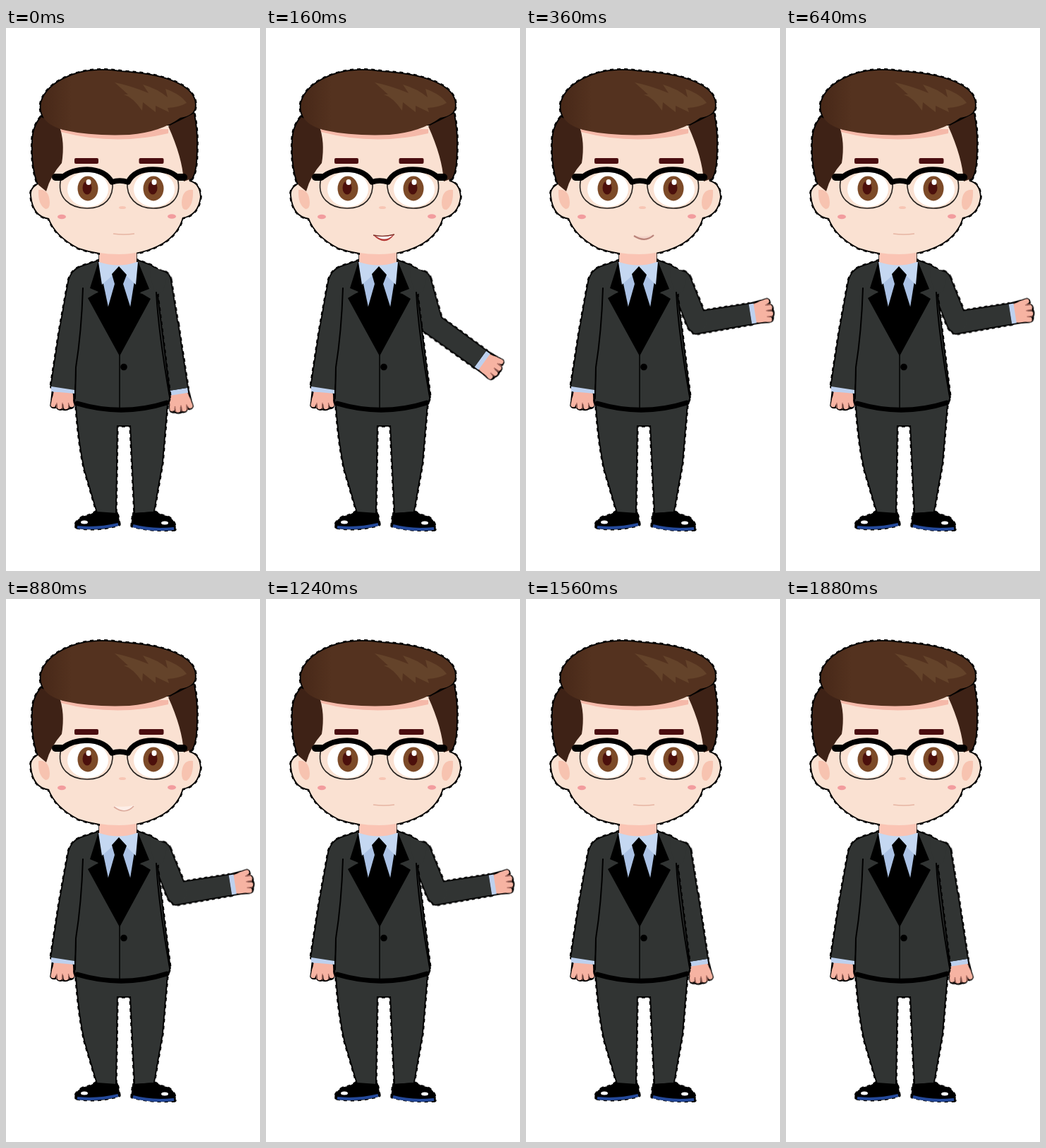
Animation, 360 px wide and 768 px high, one loop 1920 ms. Source, as an HTML page:

```html
<!DOCTYPE html>
<html lang="en">
<head>
<meta charset="utf-8">
<title>Presenter</title>
<style>
html, body { margin: 0; width: 100%; height: 100%; overflow: hidden; background: #fff; }
svg { display: block; width: 100%; height: 100%; }

.edge { stroke: #000; stroke-width: 3.6; stroke-linejoin: round; }
.rough { stroke-width: 5.4; stroke-dasharray: 5 5; }
.suit { fill: #313433; }
.skin { fill: #fae1d2; }
.side { fill: #3e2216; }
.line { fill: none; stroke: #000; stroke-linecap: round; stroke-linejoin: round; }

/* right arm: raise in 0-320 ms, lower in 1240-1520 ms */
.upper { animation: upper 1920ms infinite; }
.fore { animation: fore 1920ms infinite; }
.sleeve { animation: sleeve 1920ms infinite; }
.wrist { animation: wrist 1920ms infinite; }
@keyframes upper {
  0% { transform: rotate(81deg); animation-timing-function: steps(8); }
  16.667%, 64.583% { transform: rotate(68deg); animation-timing-function: steps(7); }
  79.167%, 100% { transform: rotate(81deg); }
}
@keyframes fore {
  0% { transform: rotate(0deg); animation-timing-function: steps(8); }
  16.667%, 64.583% { transform: rotate(-77deg); animation-timing-function: steps(7); }
  79.167%, 100% { transform: rotate(0deg); }
}
@keyframes sleeve {
  0% { transform: scaleX(1); animation-timing-function: steps(8); }
  16.667%, 64.583% { transform: scaleX(.83); animation-timing-function: steps(7); }
  79.167%, 100% { transform: scaleX(1); }
}
@keyframes wrist {
  0% { transform: translateX(92px); animation-timing-function: steps(8); }
  16.667%, 64.583% { transform: translateX(76px); animation-timing-function: steps(7); }
  79.167%, 100% { transform: translateX(92px); }
}

/* blink twice per loop */
.open-eyes { animation: awake 960ms step-end infinite; }
.shut-eyes { animation: blink 960ms step-end infinite; }
@keyframes awake { 0%, 50% { opacity: 1; } 41.667% { opacity: 0; } }
@keyframes blink { 0%, 50% { opacity: 0; } 41.667% { opacity: 1; } }

/* talking, eight steps of 40 ms */
.closed { animation: closed 320ms step-end infinite; }
.smile { animation: smile 320ms step-end infinite; }
.pale { animation: pale 320ms step-end infinite; }
.talk { transform-origin: 167px 293px; animation: talk 320ms step-end infinite; }
@keyframes closed { 0%, 87.5% { opacity: 1; } 12.5% { opacity: 0; } }
@keyframes smile { 0%, 25% { opacity: 0; } 12.5% { opacity: 1; } }
@keyframes pale { 0%, 87.5% { opacity: 0; } 75% { opacity: 1; } }
@keyframes talk {
  0%, 75% { opacity: 0; transform: none; }
  25%, 62.5% { opacity: 1; transform: scaleY(.85); }
  37.5%, 50% { opacity: 1; transform: none; }
}
</style>
</head>
<body>
<svg viewBox="0 0 360 768" preserveAspectRatio="none">
<defs>
  <linearGradient id="quiff">
    <stop offset="0" stop-color="#472818"/>
    <stop offset=".2" stop-color="#54321f"/>
  </linearGradient>
  <g id="hand">
    <path fill="#f6b3a2" d="M5 -13 L20 -16 Q26 -15 25 -8 L25 12 Q20 16 5 13Z"/>
    <path fill="none" stroke="#f6b3a2" stroke-width="7" stroke-linecap="round" d="M16 -12 L26 -14 M18 -5 L29 -5 M18 3 L29 4 M16 10 L26 12"/>
    <path fill="none" stroke="#a8665c" stroke-width="1.300" d="M23 -9 L31 -9.5 M23 -1 L32 -1 M23 7.5 L31 8"/>
    <path fill="#bdd0ee" d="M0 -14 H7 V14 H0Z"/>
  </g>
  <path id="handEdge" d="M0 -14 L20 -16 L27 -17 Q31 -15 29 -9 Q34 -6 32 -1 Q34 4 31 8 Q31 15 25 15 L14 14 L0 14Z"/>
  <path id="upperShape" d="M0 -14 L63 -14 A14 14 0 0 1 63 14 L0 14 A14 14 0 0 1 0 -14Z"/>
  <path id="foreShape" d="M0 -14.5 L92 -14 L92 14 L-5 15 Q-10 15 -10 10 L-8 -8Z"/>

  <g id="body">
    <path class="suit" d="M133 329 L106 338 Q93 343 89 358 L76 430 L64 508 L97 513 L100 480 L98 524 Q98 532 100 535 Q104 590 112 625 L130 686 L155 686 L157 562 L177 562 L183 686 L209 684 L221 615 L228 532 L232 522 L214 378 L217 344 L205 336 L186 329Z"/>
    <path d="M129 684 L157 686 L160 702 Q130 711 99 706 Q98 698 110 692 Q122 690 129 684Z"/>
    <path d="M181 686 L210 684 Q217 690 229 692 Q240 699 239 709 Q205 711 179 704Z"/>
  </g>
  <g id="head">
    <path class="skin" d="M70 138 L48 220 Q34 226 36 238 Q39 266 61 269 Q70 294 103 311 Q130 320 160 320 Q194 320 222 304 Q244 290 250 268 Q272 264 275 239 Q274 220 260 217 L240 138Z"/>
    <path fill="#f5b9a9" stroke="none" d="M78 143 H230 V149 Q155 167 78 147Z"/>
    <path class="side" d="M50 126 Q39 139 38 157 Q36 196 46 222 L57 231 Q63 209 79 191 Q84 161 75 137Z"/>
    <path class="side" d="M266 121 Q271 145 270 170 Q270 203 263 213 L252 217 Q250 183 230 139Z"/>
    <path fill="url(#quiff)" d="M54 128 Q46 113 52 100 Q62 78 96 66 Q125 56 164 62 Q215 65 242 78 Q268 90 268 109 Q268 124 247 127 Q220 147 175 151 Q122 153 85 145 Q63 140 54 128Z"/>
  </g>
</defs>

<rect width="360" height="768" fill="#fff"/>

<!-- right arm -->
<g transform="translate(219 358)"><g class="upper">
  <use href="#upperShape" class="edge"/>
  <use href="#upperShape" class="edge rough"/>
  <g transform="translate(63 0)"><g class="fore">
    <g class="sleeve"><use href="#foreShape" class="edge"/><use href="#foreShape" class="edge rough"/></g>
    <g class="wrist"><use href="#handEdge" class="edge"/><use href="#hand"/></g>
    <g class="sleeve"><use href="#foreShape" class="suit"/></g>
  </g></g>
  <use href="#upperShape" class="suit"/>
</g></g>

<!-- body -->
<g transform="translate(81 508) rotate(90) scale(.96 -1)">
  <use href="#handEdge" class="edge"/>
  <use href="#hand"/>
</g>
<use href="#body" class="edge rough"/>
<use href="#body" class="edge"/>
<use href="#body"/>
<path class="suit" d="M205 338 Q221 341 228 351 L223 372 L212 378 L204 350Z"/>
<path fill="#bdd0ee" d="M64 507 L97 512 V517 L64 514Z"/>
<path class="line" stroke-width="2" d="M109 368 Q107 430 99 480 L98 524 M213 374 Q216 430 232 522"/>
<path class="line" stroke-width="7" d="M101 531 Q165 550 228 530"/>
<path class="line" stroke-width="1.500" d="M161 460 V537"/>
<circle cx="167" cy="479.500" r="4.800"/>

<!-- shoes -->
<path fill="none" stroke="#24499b" stroke-width="4" d="M101 706 Q130 709 159 702 M180 704 Q205 711 238 708"/>
<ellipse cx="111" cy="699" rx="5" ry="2.500" fill="#fff"/>
<ellipse cx="225" cy="700" rx="5" ry="2.500" fill="#fff"/>

<!-- collar and tie -->
<path d="M131 330 L119 368 L131 373 L116 382 L161 464 L205 383 L190 374 L203 369 L187 330Z"/>
<path class="suit" d="M116 371 L131 374 L117 378Z M214 371 L189 375 L204 378Z"/>
<path fill="#abc2e5" d="M132 333 L145 395 L161 420 L176 395 L186 333Z"/>
<path fill="#c5d8f2" d="M131 331 L136 363 L152 349 L160 340 L170 350 L184 363 L187 331Z"/>
<path fill="#fac4b4" stroke="#000" stroke-width="1.500" d="M132 312 V331 M185 312 V331"/>
<path fill="#fac4b4" d="M132 312 H185 V331 Q160 340 132 331Z"/>
<path d="M150 348 L160 337 L171 349 L166 362 L177 397 L161 463 L144 397 L154 362Z"/>

<!-- head -->
<use href="#head" class="edge rough"/>
<use href="#head" class="edge"/>
<path fill="#fac4b4" d="M133 316 H185 V326 H133Z"/>
<use href="#head"/>
<path fill="#64432a" d="M154 77 Q178 82 202 92 L194 80 Q215 86 229 98 L226 86 Q248 94 256 106 Q246 112 229 113 L231 119 L212 110 L212 119 L194 105 L193 117 Q180 98 167 94 L173 94Z"/>
<path fill="#f7c3b0" d="M46 229 Q61 227 62 247 Q62 256 56 256 Q45 250 46 229Z M265 229 Q250 227 249 247 Q249 258 256 257 Q266 250 265 229Z"/>
<rect x="97" y="184" width="34" height="8" rx="2" fill="#4a0d10"/>
<rect x="188.500" y="184" width="35" height="8" rx="2" fill="#4a0d10"/>
<ellipse cx="79" cy="267" rx="6" ry="3.200" fill="#f29c9e"/>
<ellipse cx="235" cy="266.500" rx="6" ry="3.200" fill="#f29c9e"/>
<ellipse cx="165" cy="254" rx="5" ry="2" fill="#f7c5b4"/>

<!-- eyes -->
<g class="open-eyes">
  <ellipse cx="116" cy="228" rx="29" ry="25" fill="#fff"/>
  <ellipse cx="210" cy="228" rx="29" ry="25" fill="#fff"/>
  <g id="iris">
    <ellipse cx="116" cy="227" rx="14.500" ry="17.500" fill="#7c4a28"/>
    <ellipse cx="115" cy="226" rx="6.500" ry="9.500" fill="#4c100c"/>
    <ellipse cx="117" cy="218" rx="3.500" ry="4" fill="#fff"/>
  </g>
  <use href="#iris" x="93"/>
</g>
<g class="shut-eyes">
  <path id="lid" fill="none" stroke="#4a281e" stroke-width="1.800" stroke-linecap="round" d="M99 229 Q114 216 132 227 M111 229 Q123 225 131 231"/>
  <use href="#lid" x="96"/>
</g>

<!-- glasses -->
<path class="line" stroke-width="1.600" stroke-opacity=".85" d="M78 213 C71 240 91 255 115 255 C140 255 153 240 151 217 M172 217 C170 240 185 255 209 255 C233 255 250 240 243 213"/>
<path class="line" stroke-width="7.500" d="M70 211 H80 Q93 200 115 200 Q141 201 150 218 Q161 214 173 218 Q182 200 208 200 Q232 200 243 211 H253"/>
<path class="line" stroke-width="10" d="M70 211 H78 M245 211 H252"/>

<!-- mouth -->
<path class="closed" fill="none" stroke="#e6b5a3" stroke-width="1.600" d="M152 291 Q167 293 182 291"/>
<g class="smile">
  <path fill="#f3d3c9" d="M152 293 Q167 297 182 292 Q169 308 152 293Z"/>
  <path fill="none" stroke="#b98379" stroke-width="2.200" d="M153 294 Q169 304 181 293"/>
</g>
<g class="pale">
  <path fill="#fdeee7" d="M152 293 Q167 295 182 292 Q169 308 152 293Z"/>
  <path fill="none" stroke="#dba99b" stroke-width="1.600" d="M153 294 Q169 306 181 293"/>
</g>
<g class="talk">
  <path fill="#b63b38" d="M152 293 Q167 296 182 292 Q169 310 152 293Z"/>
  <path fill="#fff" d="M154 293 Q167 296 180 293 Q168 304 154 293Z"/>
  <path fill="none" stroke="#7d3029" stroke-width="1.300" d="M152 293 Q167 296 182 292"/>
</g>
</svg>
</body>
</html>
```
